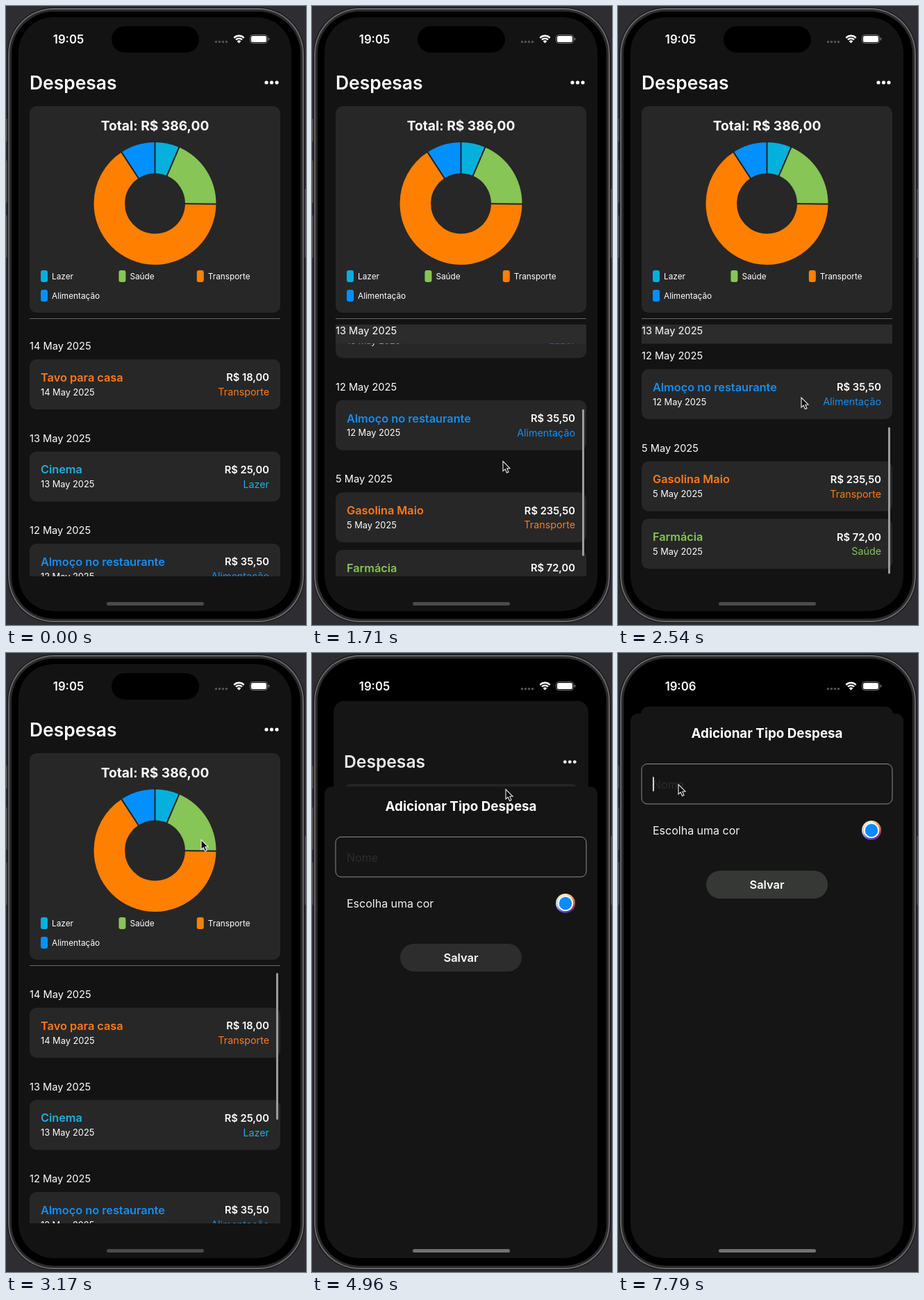
Animation, 432 px wide and 890 px high, one loop 8 s. Source, as an HTML page with a canvas:

```html
<!DOCTYPE html>
<html lang="pt-BR">
<head>
<meta charset="utf-8">
<title>Despesas</title>
<style>
html, body { margin: 0; width: 100%; height: 100%; overflow: hidden; background: #2d2d32; }
canvas { display: block; width: 432px; height: 890px; }
</style>
</head>
<body>
<canvas id="stage"></canvas>
<script>
const W = 432, H = 890, LOOP = 8000;
const canvas = document.getElementById('stage');
const ctx = canvas.getContext('2d');
const ratio = window.devicePixelRatio || 1;
canvas.width = W * ratio;
canvas.height = H * ratio;

const CYAN = '#05b0dc', GREEN = '#87c556', ORANGE = '#ff8000', BLUE = '#0390ff';
const BG = '#131313', CARD = '#272727';
const MID = 214.5;

const kinds = [
  { name: 'Lazer', color: CYAN, ink: '#20aee4', sum: 25 },
  { name: 'Saúde', color: GREEN, ink: GREEN, sum: 72 },
  { name: 'Transporte', color: ORANGE, ink: '#ff7a1a', sum: 253.5 },
  { name: 'Alimentação', color: BLUE, ink: '#138ff5', sum: 35.5 }
];
const total = kinds.reduce((n, k) => n + k.sum, 0);

const days = [
  { date: '14 May 2025', y: 489, items: [['Tavo para casa', 18, 2]] },
  { date: '13 May 2025', y: 621.5, items: [['Cinema', 25, 0]] },
  { date: '12 May 2025', y: 754, items: [['Almoço no restaurante', 35.5, 3]] },
  { date: '5 May 2025', y: 886.5, items: [['Gasolina Maio', 235.5, 2], ['Farmácia', 72, 1]] }
];

// Motion keys: time followed by values
const scrollKeys = [[700, 0], [1000, 122], [1160, 164], [1400, 172], [1580, 172], [1710, 206],
  [1860, 251], [2020, 270], [2350, 251], [2590, 251], [2800, 110], [2980, -26], [3170, -2], [3290, 0]];
const pointerKeys = [[40, 424, 700], [520, 266, 668], [700, 266, 665], [1000, 265, 543], [1160, 264, 505],
  [1520, 275, 692], [1600, 276, 690], [1710, 275, 655], [1960, 264, 563], [2560, 264, 563],
  [2800, 268, 730], [3170, 281, 269], [3750, 380, 110], [4230, 380, 110], [4600, 279, 196],
  [5600, 279, 196], [5880, 366, 243], [6100, 366, 243], [6130, 174, 199], [6600, 174, 199],
  [6630, 149, 199], [7250, 149, 199], [7560, 87, 189]];

const money = n => 'R$ ' + n.toFixed(2).replace('.', ',');
const clamp = x => Math.max(0, Math.min(1, x));

// Smooth curve through the keys without overshoot
function track(keys, t, c = 1) {
  const last = keys.length - 1;
  if (t <= keys[0][0]) return keys[0][c];
  if (t >= keys[last][0]) return keys[last][c];
  let i = 0;
  while (keys[i + 1][0] < t) i++;
  const slope = j => j < 0 || j >= last ? 0 : (keys[j + 1][c] - keys[j][c]) / (keys[j + 1][0] - keys[j][0]);
  const tangent = j => {
    const a = slope(j - 1), b = slope(j);
    return a * b <= 0 ? 0 : 2 * a * b / (a + b);
  };
  const h = keys[i + 1][0] - keys[i][0], u = (t - keys[i][0]) / h, v = 1 - u;
  return keys[i][c] * (1 + 2 * u) * v * v + keys[i + 1][c] * u * u * (3 - 2 * u)
    + h * u * v * (tangent(i) * v - tangent(i + 1) * u);
}

function path(x, y, w, h, r) {
  ctx.beginPath();
  ctx.roundRect(x, y, w, h, r);
}
function box(x, y, w, h, r, color) {
  path(x, y, w, h, r);
  ctx.fillStyle = color;
  ctx.fill();
}
function disc(x, y, r, color) {
  ctx.beginPath();
  ctx.arc(x, y, r, 0, 2 * Math.PI);
  ctx.fillStyle = color;
  ctx.fill();
}
function text(s, x, y, size, color = '#fff', weight = 400, align = 'left') {
  ctx.font = `${weight} ${size}px Inter, Roboto, sans-serif`;
  ctx.textAlign = align;
  ctx.fillStyle = color;
  ctx.fillText(s, x, y + size * 0.36);
}

function drawDevice() {
  ctx.fillStyle = '#2d2d32';
  ctx.fillRect(0, 0, W, H);
  for (const [y, h] of [[162, 33], [222, 61], [301, 61]]) box(0, y, 4, h, 1, '#4b4b4e');
  box(428, 263, 4, 99, 1, '#4b4b4e');
  box(2, 2, 428, 885, 67, '#0f0f10');
  box(3, 3, 426, 883, 66, '#666668');
  box(5, 5, 422, 879, 64, '#29292a');
  box(8, 8, 416, 873, 61, '#000');
}

function drawDonut() {
  let a = -Math.PI / 2;
  const cy = 284;
  ctx.strokeStyle = '#202224';
  ctx.lineWidth = 2;
  for (const k of kinds) {
    const b = a + k.sum / total * 2 * Math.PI;
    ctx.beginPath();
    ctx.arc(MID, cy, 88, a, b);
    ctx.arc(MID, cy, 43.5, b, a, true);
    ctx.closePath();
    ctx.fillStyle = k.color;
    ctx.fill();
    a = b;
  }
  for (const k of kinds) {
    ctx.beginPath();
    ctx.moveTo(MID + 43 * Math.cos(a), cy + 43 * Math.sin(a));
    ctx.lineTo(MID + 88.5 * Math.cos(a), cy + 88.5 * Math.sin(a));
    ctx.stroke();
    a += k.sum / total * 2 * Math.PI;
  }
}

function drawSummary() {
  text('Despesas', 34, 110, 26.4, '#fff', 600);
  for (const x of [375, 382.5, 390]) disc(x, 110, 2.6, '#fff');
  box(34, 144, 361, 297, 10, CARD);
  text('Total: ' + money(total), MID, 172, 19.2, '#fff', 700, 'center');
  drawDonut();
  kinds.forEach((k, i) => {
    const x = 50 + i % 3 * 112.4, y = i < 3 ? 388.5 : 416.5;
    box(x, y - 8.5, 10, 17, 3, k.color);
    text(k.name, x + 16, y, 11.8);
  });
  ctx.fillStyle = '#666';
  ctx.fillRect(34, 449, 361, 1);
}

function drawItem([name, cost, kind], y) {
  const k = kinds[kind];
  box(34, y, 361, 72, 10, CARD);
  text(name, 50, y + 26, 16.3, k.ink, 600);
  text(money(cost), 379, y + 26, 14.7, '#fff', 600, 'right');
  text(k.name, 379, y + 47, 14.3, k.ink, 400, 'right');
}

function drawList(t) {
  const scroll = track(scrollKeys, t);
  ctx.save();
  ctx.beginPath();
  ctx.rect(18, 458, 393, 362);
  ctx.clip();
  for (const d of days) {
    d.items.forEach((item, i) => {
      const y = d.y + 19 + i * 82.8 - scroll;
      drawItem(item, y);
      text(d.date, 50, y + 47, 12.8);
    });
  }
  // Section headings stick to the top until the next one pushes them out
  days.forEach((d, i) => {
    let y = d.y - scroll;
    if (y < 467) {
      const next = days[i + 1];
      y = next ? Math.min(467, next.y - scroll - 28) : 467;
      ctx.fillStyle = '#2b2c2b';
      ctx.fillRect(34, y - 9, 361, 27.5);
    }
    text(d.date, 34, y, 14.6);
  });
  ctx.globalAlpha *= clamp((t - 700) / 100) * clamp((3800 - t) / 300);
  box(389, 460 + Math.max(0, scroll) * 0.58, 3, 211, 1.5, '#9c9c9c');
  ctx.restore();
}

function drawWell(x, y) {
  const g = ctx.createConicGradient(-Math.PI / 2, x, y);
  ['#f3ecc0', '#f0a050', '#c03c50', '#5a2c9c', '#5a50c8', '#b4c8dc', '#e8e4c8', '#f3ecc0']
    .forEach((c, i, all) => g.addColorStop(i / (all.length - 1), c));
  disc(x, y, 14, g);
  disc(x, y, 11.3, '#f4f4f4');
  disc(x, y, 9.2, '#0a8bff');
}

function drawSheet(top, t) {
  ctx.save();
  ctx.translate(0, top);
  box(18, 0, 393, 900, [11, 11, 0, 0], '#151515');
  text('Adicionar Tipo Despesa', MID, 28, 18.8, '#fff', 700, 'center');
  path(34, 72.5, 361, 57.5, 8);
  ctx.strokeStyle = '#8b8b8b';
  ctx.lineWidth = 1;
  ctx.stroke();
  text('Nome', 50, 102, 16, '#2c2c2c');
  if (t > 7560) box(50, 91, 1.8, 21, 1, '#e8e8e8');
  text('Escolha uma cor', 50, 168.5, 16, '#f4f4f4');
  drawWell(365, 168);
  box(127, 226, 175, 40, 20, t < 5460 ? '#2d2d2d' : '#363836');
  text('Salvar', MID, 246, 16.4, '#fff', 600, 'center');
  ctx.restore();
}

function drawStatus(t, rise) {
  box(152, 29, 126, 38, 19, '#000');
  text(t < 5700 ? '19:05' : '19:06', 90, 47.5, 16.7, '#fff', 600, 'center');
  for (let i = 0; i < 4; i++) disc(302.5 + i * 5, 51.5, 1.7, '#555');
  ctx.strokeStyle = '#fff';
  ctx.lineWidth = 2.4;
  for (const r of [6.4, 10.2]) {
    ctx.beginPath();
    ctx.arc(335.5, 53, r, -Math.PI * 0.75, -Math.PI * 0.25);
    ctx.stroke();
  }
  ctx.beginPath();
  ctx.moveTo(335.5, 53.5);
  ctx.arc(335.5, 53.5, 4, -Math.PI * 0.75, -Math.PI * 0.25);
  ctx.fillStyle = '#fff';
  ctx.fill();
  path(351.5, 41.5, 25, 12, 4);
  ctx.strokeStyle = '#777';
  ctx.lineWidth = 1;
  ctx.stroke();
  box(353, 43, 22, 9, 2.5, '#fff');
  box(377.7, 45.5, 1.5, 4, 1, '#777');
  box(145, 857, 140, 5, 2.5, rise > 0.3 ? '#727272' : '#4a4a4a');
}

function drawPointer(t) {
  if (t < 40) return;
  ctx.save();
  ctx.translate(track(pointerKeys, t, 1), track(pointerKeys, t, 2));
  ctx.beginPath();
  [[0, 0], [0, 14], [3.2, 11.2], [5.5, 16.5], [8, 15.4], [5.8, 10.2], [10, 10]]
    .forEach(([x, y]) => ctx.lineTo(x, y));
  ctx.closePath();
  ctx.fillStyle = '#0a0a0a';
  ctx.fill();
  ctx.strokeStyle = '#f0f0f0';
  ctx.lineWidth = 1.1;
  ctx.stroke();
  ctx.restore();
}

function draw(t) {
  ctx.setTransform(ratio, 0, 0, ratio, 0, 0);
  drawDevice();

  // Critically damped rise of the sheet
  const w = Math.max(0, t - 4710) * 0.01404;
  const rise = 1 - (1 + w) * Math.exp(-w);

  ctx.save();
  path(18, 16, 393, 854, 50);
  ctx.clip();
  ctx.save();
  const scale = 1 - 0.077 * rise;
  ctx.translate(MID, 16 + 61 * rise);
  ctx.scale(scale, scale);
  ctx.translate(-MID, -16);
  path(18, 16, 393, 854, 50 - 38 * rise);
  ctx.clip();
  ctx.fillStyle = rise > 0 ? '#171717' : BG;
  ctx.fillRect(18, 16, 393, 854);
  drawSummary();
  drawList(t);
  ctx.fillStyle = `rgba(0,0,0,${0.1 * rise})`;
  ctx.fillRect(18, 16, 393, 854);
  ctx.restore();
  if (rise > 0) drawSheet(87 + 787 * (1 - rise), t);
  ctx.restore();

  drawStatus(t, rise);
  drawPointer(t);
}

const start = performance.now();
function tick(now) {
  draw(Math.max(0, now - start) % LOOP);
  requestAnimationFrame(tick);
}
draw(0);
requestAnimationFrame(tick);
</script>
</body>
</html>
```
